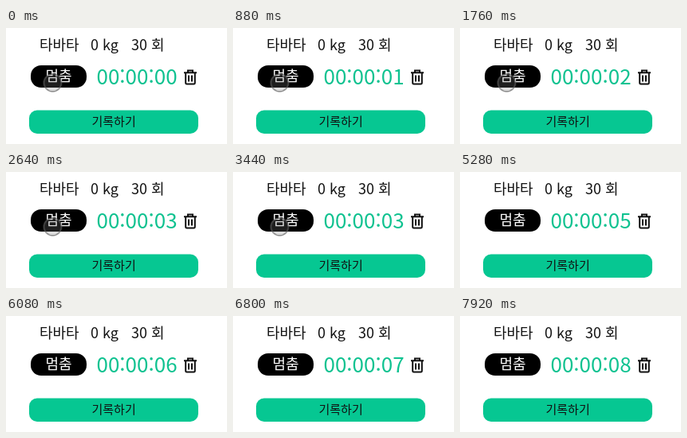
Animation, 277 px wide and 146 px high, one loop 8 s. Source, as an HTML page:

```html
<!DOCTYPE html>
<html lang="ko">
<head>
<meta charset="utf-8">
<style>
  html, body { margin: 0; width: 100%; height: 100%; overflow: hidden; background: #fff; }
  svg { display: block; width: 277px; height: 146px; }
  text { font-family: "Noto Sans CJK KR", "Noto Sans CJK", "Noto Sans", sans-serif; font-size: 18px; fill: #111; }
  .medium { font-weight: 500; }
  #clock { font-size: 26px; fill: #0fc290; }
  #pointer { animation: leave 8s linear infinite; }
  @keyframes leave {
    0%, 51% { transform: translate(58.5px, 69px); }
    54%, 100% { transform: translate(-16px, 36px); }
  }
</style>
</head>
<body>
<svg viewBox="0 0 277 146">
  <text x="42" y="28">타바타</text>
  <text x="106" y="28">0 kg</text>
  <text x="157" y="28">30 회</text>

  <rect x="31" y="47" width="70" height="28" rx="13"/>
  <text class="medium" x="49.5" y="67" style="fill:#fff">멈춤</text>
  <text class="medium" id="clock" x="113.5" y="71">00:00:00</text>

  <g fill="none" stroke="#111" stroke-width="2">
    <path d="M223 56.2H239M228 56V53.6H234V56"/>
    <path d="M225.2 57V69.2Q225.2 70.6 226.6 70.6H235.4Q236.8 70.6 236.8 69.2V57"/>
    <path d="M229 59.5V67.5M233 59.5V67.5"/>
  </g>

  <rect x="29" y="103.5" width="212" height="29.5" rx="10" fill="#06c792"/>
  <text x="107.5" y="123" style="font-size:15px">기록하기</text>

  <g id="pointer">
    <circle r="11" fill="#777" fill-opacity=".25" stroke="#666" stroke-opacity=".75" stroke-width="1.5"/>
  </g>
</svg>
<script>
  const LOOP = 8000, LEAD = 400;
  const clock = document.getElementById("clock");
  const pointer = document.getElementById("pointer").getAnimations()[0];
  const start = performance.now();
  pointer.startTime = start;

  function draw() {
    const time = (performance.now() - start) % LOOP;
    clock.textContent = "00:00:0" + Math.floor((time + LEAD) / 1000);
    requestAnimationFrame(draw);
  }
  draw();
</script>
</body>
</html>
```
